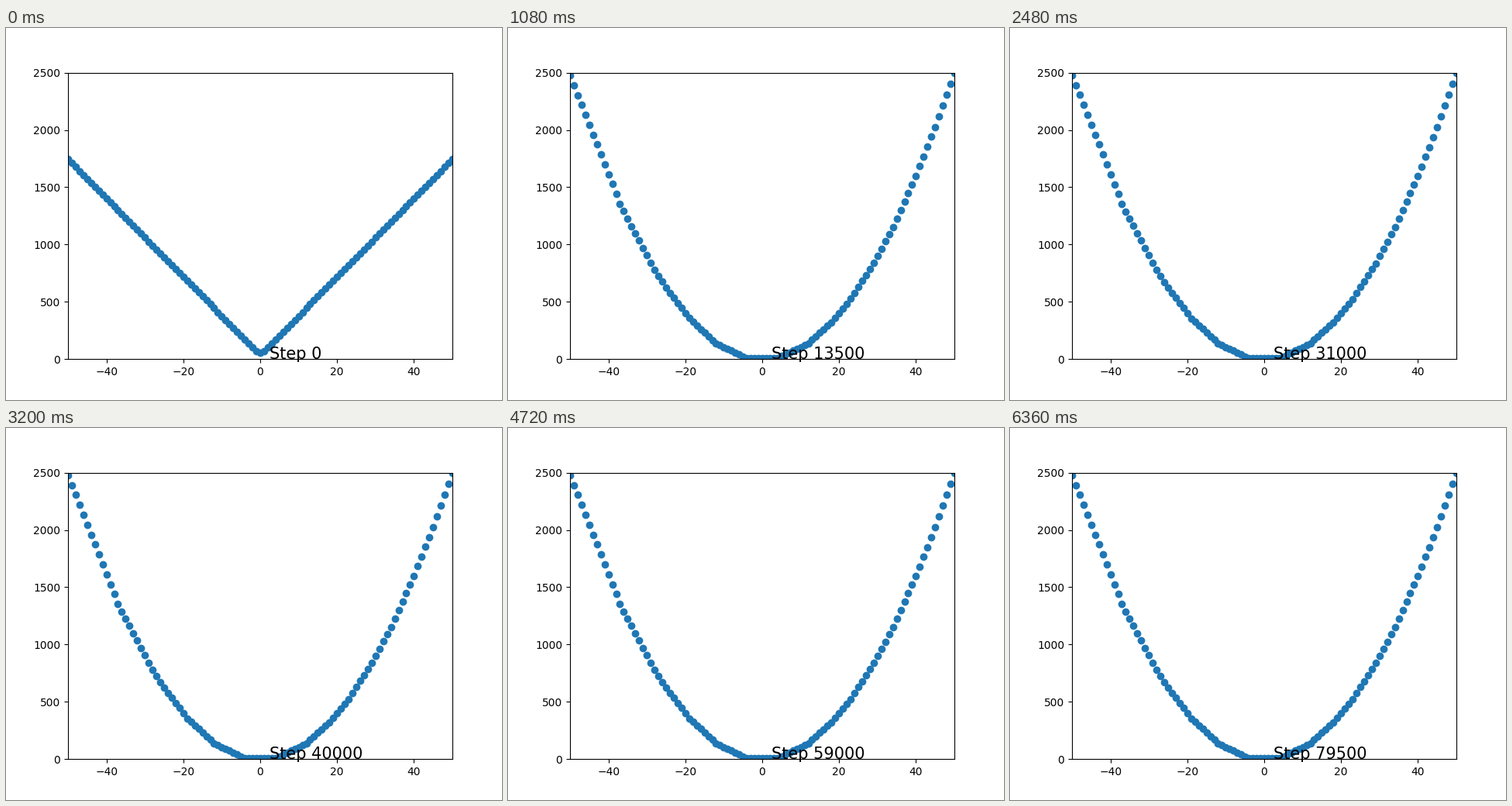
Write a matplotlib script that moves like this. It is 640 by 480 pixels and loops after 6.4 s.

```python
import numpy as np
import matplotlib.pyplot as plt
from matplotlib.animation import FuncAnimation

plt.rcParams["font.family"] = "DejaVu Sans"

FRAMES, INTERVAL = 160, 40
STEPS_PER_FRAME = 500
BEND, SETTLE = 12, 44  # frames where the fit is nearly there / has converged

x = np.arange(-50, 51)


def chord_fit(kinks):
    """Polyline through kinks, lowered so its chords straddle x squared."""
    k = np.array(kinks, float)
    sag = np.diff(k) ** 2 / 8
    sag = (np.append(sag[0], sag) + np.append(sag, sag[-1])) / 2
    return np.interp(x, k, k ** 2 - sag)


def decay(i, span, tau):
    """Exponential approach from 0 to 1 over span frames."""
    i = min(i, span)
    return (1 - np.exp(-i / tau)) / (1 - np.exp(-span / tau))


start = np.maximum(56, 34 + 34.2 * np.abs(x))

# early fit: long straight arms over a flat floor
rough = np.interp(x, [-50, -33, -25, -13, -10, -6, 4, 11, 22, 27, 33, 50],
                  [2440, 1070, 637, 110, 103, 42, 42, 96, 481, 728, 1070, 2456])

final = chord_fit([-50, -37, -28, -25, -19, -12, -4, 4, 12,
                   18, 23, 29, 34, 40, 45, 50])


def curve(i):
    if i <= BEND:
        return start + (rough - start) * decay(i, BEND, 4)
    y = rough + (final - rough) * decay(i - BEND, SETTLE - BEND, 5)
    # training noise: the right arm keeps trembling by under a pixel
    wobble = np.random.default_rng(i).normal(0, 0.0006)
    return np.where(x > 0, y * (1 + wobble), y)


fig, ax = plt.subplots(figsize=(6.4, 4.8), dpi=100)
ax.set_xlim(-50, 50)
ax.set_ylim(0, 2500)
dots = ax.scatter(x, start)
label = ax.text(2.5, 0, "Step 0", fontsize=15)


def update(i):
    dots.set_offsets(np.column_stack([x, curve(i)]))
    label.set_text(f"Step {i * STEPS_PER_FRAME}")
    return dots, label


anim = FuncAnimation(fig, update, frames=FRAMES, interval=INTERVAL,
                     repeat=True, repeat_delay=0)
plt.show()
```
